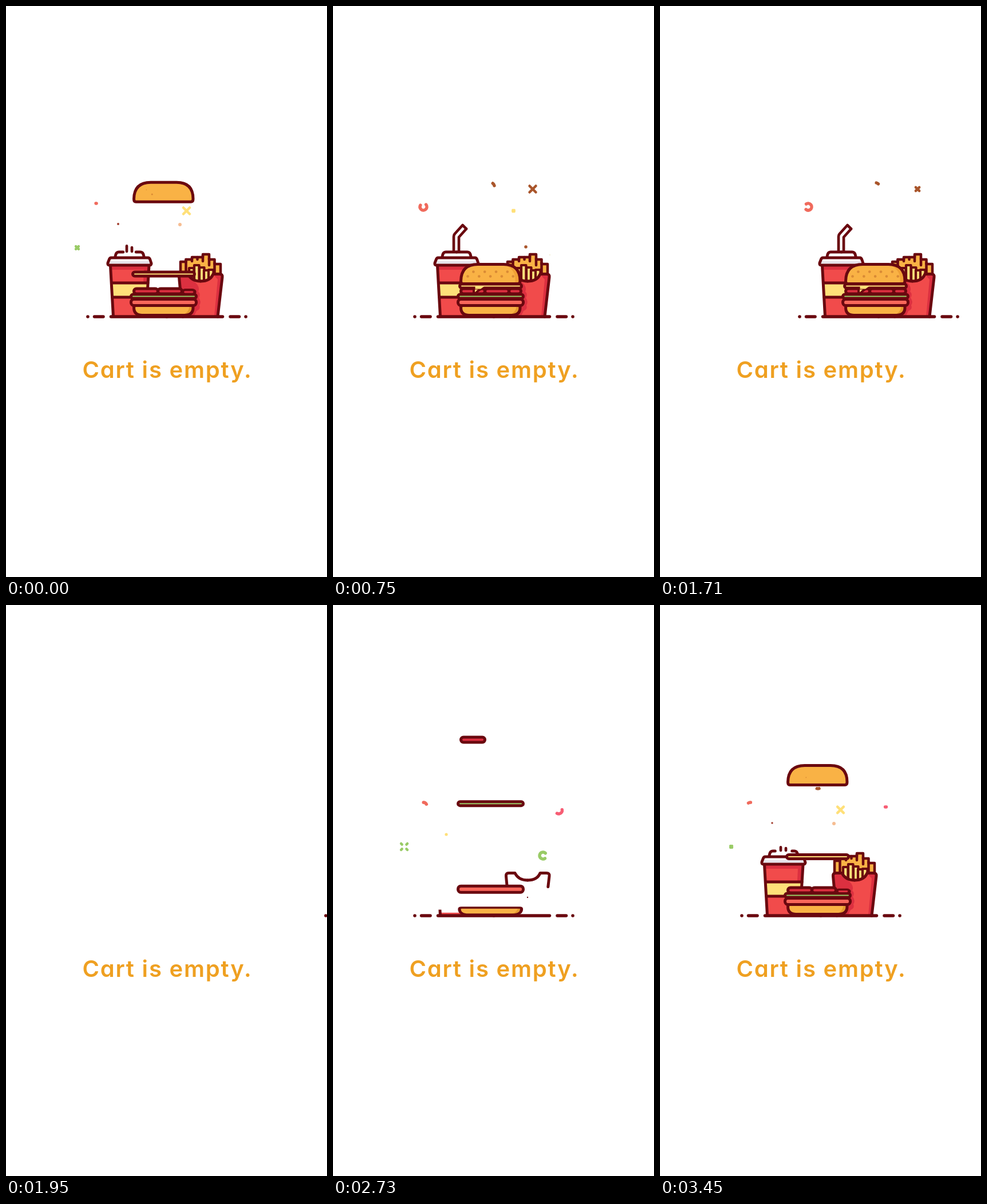
Write an HTML page with a canvas that moves like this. It is 561 by 998 pixels and loops after 3.48 s.

```html
<!DOCTYPE html>
<html lang="en">
<head>
<meta charset="utf-8">
<title>Cart is empty</title>
<style>
  html, body { margin: 0; width: 100%; height: 100%; overflow: hidden; background: #fff; }
  canvas, svg { position: absolute; left: 0; top: 0; }
  text { font: 600 40px Inter, "Open Sans", sans-serif; font-feature-settings: "cv11"; letter-spacing: 1.8px; fill: #efa021; }
</style>
</head>
<body>
<canvas id="stage" width="561" height="998"></canvas>
<svg width="561" height="998"><text x="282" y="650" text-anchor="middle">Cart is empty.</text></svg>
<script>
const ctx = document.getElementById('stage').getContext('2d');
const LOOP = 3480, BUILD_START = 2130;
const DARK = '#6a080f', RED = '#f14b4b', DEEP = '#dc3040', ORANGE = '#f9b245', YELLOW = '#ffe079',
      GREEN = '#99cb66', TOMATO = '#f9675a', BROWN = '#a9552b', SALMON = '#f06a5c', PINK = '#f75d74';

const clamp = v => Math.max(0, Math.min(1, v));
const ramp = (t, from, to) => clamp((t - from) / (to - from));
const mix = (a, b, p) => a + (b - a) * p;

function scoped(fn) { ctx.save(); fn(); ctx.restore(); }

function clipTo(x, y, w, h) { ctx.beginPath(); ctx.rect(x, y, w, h); ctx.clip(); }

function fill(d, color) { ctx.fillStyle = color; ctx.fill(new Path2D(d)); }

function line(d, width = 5, color = DARK) {
  ctx.strokeStyle = color;
  ctx.lineWidth = width;
  ctx.stroke(new Path2D(d));
}

function shape(d, color, width) { fill(d, color); line(d, width); }

// Strokes the first part p of a path of the given length.
function trim(d, length, p, width) {
  if (p <= 0) return;
  scoped(() => {
    if (p < 1) ctx.setLineDash([length * p, length * 2]);
    line(d, width);
  });
}

function bar(x0, x1, height, color) {
  const h = height - 5;
  ctx.beginPath();
  ctx.roundRect(x0 + 2.5, -h / 2, x1 - x0 - 5, h, Math.min(5, h / 2));
  ctx.fillStyle = color;
  ctx.fill();
  ctx.strokeStyle = DARK;
  ctx.lineWidth = 5;
  ctx.stroke();
}

// ---- confetti ----
function burst(t, x, y, color, starts) {
  for (const start of starts) {
    const age = t - start;
    if (age < 0 || age > 450) continue;
    const outer = 1 + 4.5 * clamp(age / 130), inner = 5.5 * clamp((age - 180) / 270);
    for (const [sx, sy] of [[1, 1], [1, -1], [-1, 1], [-1, -1]])
      line(`M${x + sx * inner} ${y + sy * inner}L${x + sx * outer} ${y + sy * outer}`, 4.5 * clamp((450 - age) / 60), color);
  }
}

// The leading end sits at a + b*age + c*age² degrees; the tail grows and shrinks behind it.
function curl(t, x, y, color, start, life, a, b, c = 0) {
  const age = t - start;
  if (age < 0 || age > life) return;
  const end = a + b * age + c * age * age, length = 260 * Math.sin(Math.PI * age / life);
  ctx.beginPath();
  ctx.arc(x, y, 6, (end - length) * Math.PI / 180, end * Math.PI / 180);
  ctx.strokeStyle = color;
  ctx.lineWidth = 5.5;
  ctx.stroke();
}

function dot(t, x, y, r, color, start, life) {
  const age = t - start;
  if (age < 0 || age > life) return;
  ctx.beginPath();
  ctx.arc(x, y, r * Math.sin(Math.PI * age / life), 0, 7);
  ctx.fillStyle = color;
  ctx.fill();
}

function drawConfetti(t) {
  burst(t, 124.5, 422.5, GREEN, [230, 1310, 2390]);
  burst(t, 349, 320, BROWN, [860, 1940, 3000]);
  burst(t, 315.5, 358, YELLOW, [1195, 2095]);

  curl(t, 158, 351, SALMON, 540, 820, 337, -.082);
  curl(t, 158, 351, SALMON, 1620, 820, 249, -.082);
  curl(t, 158, 351, SALMON, 2700, 820, 160, -.082);
  curl(t, 394.5, 359, PINK, 450, 890, 119, .058, -.00033);
  curl(t, 367, 438, GREEN, 225, 790, 285, .447, -.00098);
  curl(t, 276, 315, BROWN, 1290, 700, 110, -.1);
  curl(t, 276, 315, BROWN, 2060, 700, 355, -.1);
  curl(t, 276, 315, BROWN, 3030, 700, 320, -.1);

  dot(t, 198, 401, 3, YELLOW, 520, 240);
  dot(t, 285, 340, 2.7, PINK, 760, 260);
  dot(t, 196, 381, 2, '#a03a2b', 1240, 260);
  dot(t, 304, 382, 3, '#f6bd92', 860, 900);
  dot(t, 337, 421, 2.8, BROWN, 2000, 220);
  dot(t, 379, 435, 3.5, '#e3d9a0', 2080, 320);
  dot(t, 340, 511, 1.2, DARK, 540, 150);
}

// ---- ground, mirrored around x = 281 ----
function drawGround(t) {
  const shift = 3 * (1 - ramp(t, 260, 480)), dash = 15.5 * ramp(t, 60, 150), main = 97.5 * ramp(t, 190, 500);
  for (const side of [-1, 1]) scoped(() => {
    ctx.translate(281, 543);
    ctx.scale(side, 1);
    const dotSize = 5.5 * ramp(t, 0, 60);
    if (dotSize) line(`M${138 + shift} 0h.1`, dotSize);
    if (dash) line(`M${111 + shift} 0h${dash}`, 5.5);
    if (main) line(`M97.5 0h${-main}`, 5.5);
  });
}

// ---- cup ----
function drawCup(t) {
  const level = mix(542, 452, ramp(t, 585, 915)), edge = mix(541, 452, ramp(t, 560, 995));
  const body = 'M182.5 454L187.5 543H244.5L250 454Z';
  if (level < 542) {
    scoped(() => {
      clipTo(170, level, 90, 543 - level);
      fill(body, RED);
      if (t > 950) fill('M182.5 454H250L244.5 543H237L241 461H183Z', DEEP);
      fill('M184.5 484H248L246.5 509H186Z', YELLOW);
    });
  }
  scoped(() => {
    clipTo(170, edge, 90, 545 - edge);
    line('M182.5 454L187.5 543M250 454L244.5 543');
    if (level < 509) line('M186 509H246.5');
  });
  trim('M248 484H185', 63, ramp(t, 830, 930));

  // lid opens from its centre
  const half = mix(0, 42, ramp(t, 840, 1100));
  if (half) scoped(() => {
    clipTo(215.5 - half, 435, half * 2, 22);
    shape('M184 440H248Q251 440 252 444L254 450Q254 453 250 453H181Q177 453 178 449L180 444Q181 440 184 440Z', '#fff');
    fill('M182 446H250L251 450H181Z', '#e6e2ea');
  });
  const rim = ramp(t, 1190, 1460);
  trim('M191 438Q192 430 197 430H216', 31, rim);
  trim('M241 438Q240 430 235 430H216', 31, rim);

  const straw = ramp(t, 1280, 1740);
  trim('M211 429V403Q211 400 213 398L226.5 383L233 389.5', 62, straw, 4.7);
  trim('M220 429V404L233 389.5', 45, straw, 4.7);
}

// ---- fries ----
function drawFries(t) {
  const rise = ramp(t, 690, 900);
  if (rise) scoped(() => {
    const tops = 'M305 486V447H314.5V443H325V439H344V434H355V443H364.5V451H375V470L362 486Z';
    clipTo(295, 420, 90, 62);
    ctx.translate(0, 46 * (1 - rise));
    shape(tops, ORANGE, 4.5);
    line('M314.5 443V470M325 441V446M334.5 439V443M344 436V446M355 441V453M364.5 449V470', 4.5);
  });
  [[320, 458], [329, 453], [338, 457], [346, 462], [354, 461]].forEach(([x, top], i) => {
    const grow = ramp(t, 820 + i * 40, 1080 + i * 40);
    if (grow) shape(`M${x} 482V${mix(482, top, grow)}h8.5V482Z`, YELLOW, 4.2);
  });

  const level = mix(543, 465, ramp(t, 670, 850));
  const box = 'M309 543L302.5 474Q302 468.500 307 468.500H318Q324 481 340 481Q357 481 362 468.500H373Q379 468.500 378 474L370 543Z';
  if (level < 543) scoped(() => {
    clipTo(295, level, 90, 543 - level);
    fill(box, RED);
    if (t < 940) {
      fill('M304 470H316L320 478Q311 474 306 484Z', '#f9b4b4');
      fill('M376 470H364L360 478Q369 474 374 484Z', '#f9b4b4');
    } else {
      fill('M304 470H318Q320 478 328 481Q340 490 336 499Q341 504 337 510Q342 517 338 523Q341 530 333 533L328 543H309Z', DEEP);
      fill('M363 470H377L370 543H364L370 478Z', DEEP);
    }
  });
  const p = ramp(t, 420, 750);
  trim('M340 481Q324 481 318 468.500H307Q302 468.500 302.500 474L309 543', 119, p);
  trim('M340 481Q357 481 362 468.500H373Q379 468.500 378 474L370 543', 119, p);
}

// ---- burger: each layer falls at a steady speed and squashes as it lands ----
function layer(t, rest, land, half, draw, speed = .79) {
  const y = Math.min(rest, rest - (land - t) * speed);
  if (y < 190) return;
  const since = t - land;
  const squash = since > 0 && since < 160 ? Math.sin(Math.PI * since / 160) : 0;
  scoped(() => {
    ctx.translate(275.5, y + half);
    ctx.scale(1 + .05 * squash, 1 - .3 * squash);
    ctx.translate(-275.5, -half);
    draw();
  });
}

function bottomBun(landed) {
  const d = 'M227 -8.500H324Q327 -8.500 327 -5Q327 8.500 312 8.500H238Q223.500 8.500 223.500 -5Q223.500 -8.500 227 -8.500Z';
  fill(d, ORANGE);
  if (landed) fill('M321 -8H326Q327 8 312 8H306Q319 6 321 -8Z', '#e59a30');
  line(d);
}

function cheese(t) {
  const drip = ramp(t, 1390, 1600);
  if (drip) shape(`M246 2V${2 + 9 * drip}Q247 ${3 + 11 * drip} 250 ${2 + 10 * drip}Q257 3 270 2Z`, YELLOW, 4);
  bar(219, 332, 12, YELLOW);
  if (drip) fill('M248.500 0H265L258 5H248.500Z', YELLOW);
}

function topBun(t) {
  const d = 'M227 17Q223.500 17 223.500 12Q224 -17 253 -17H298Q327 -17 327 12Q327 17 323 17Z';
  fill(d, ORANGE);
  if (t > 1600) fill('M298 -17Q327 -15 325 16H318Q322 -8 298 -17Z', '#f0a035');
  ctx.fillStyle = '#d98a35';
  for (let i = 0; i < 9; i++) {
    const start = 1265 + Math.abs(i - 1.8) * 60;
    ctx.beginPath();
    ctx.arc(235.500 + 9.9 * i, i % 2 ? -4 : 4, 2.3 * ramp(t, start, start + 120), 0, 7);
    ctx.fill();
  }
  line(d);
}

function drawBurger(t) {
  layer(t, 532, 510, 10, () => bottomBun(t > 560));
  layer(t, 518, 628, 8, () => bar(216, 335, 16, TOMATO));
  layer(t, 507.5, 804, 6, () => bar(216, 335, 12, GREEN));
  layer(t, 498.5, 934, 7, () => bar(221, 268, 14, DEEP));
  layer(t, 498.5, 1106, 7, () => bar(263, 310, 14, DEEP));
  layer(t, 498.5, 1224, 7, () => bar(305, 331, 14, DEEP));
  layer(t, 489.5, 1373, 6, () => cheese(t), .95);
  layer(t, 468.5, 1505, 19.5, () => topBun(t), .93);
}

function slide(t) {
  const p = ramp(t, 2897, 3381);
  return 440 * (p < .5 ? 2 * p * p : 1 - 2 * (1 - p) * (1 - p));
}

function frame() {
  const t = (performance.now() + LOOP - BUILD_START) % LOOP;
  ctx.clearRect(0, 0, 561, 998);
  scoped(() => {
    ctx.lineCap = ctx.lineJoin = 'round';
    clipTo(0, 219, 561, 340);
    ctx.translate(slide(t), 0);
    drawConfetti(t);
    drawCup(t);
    drawFries(t);
    drawGround(t);
    drawBurger(t);
  });
  requestAnimationFrame(frame);
}
frame();
</script>
</body>
</html>
```
